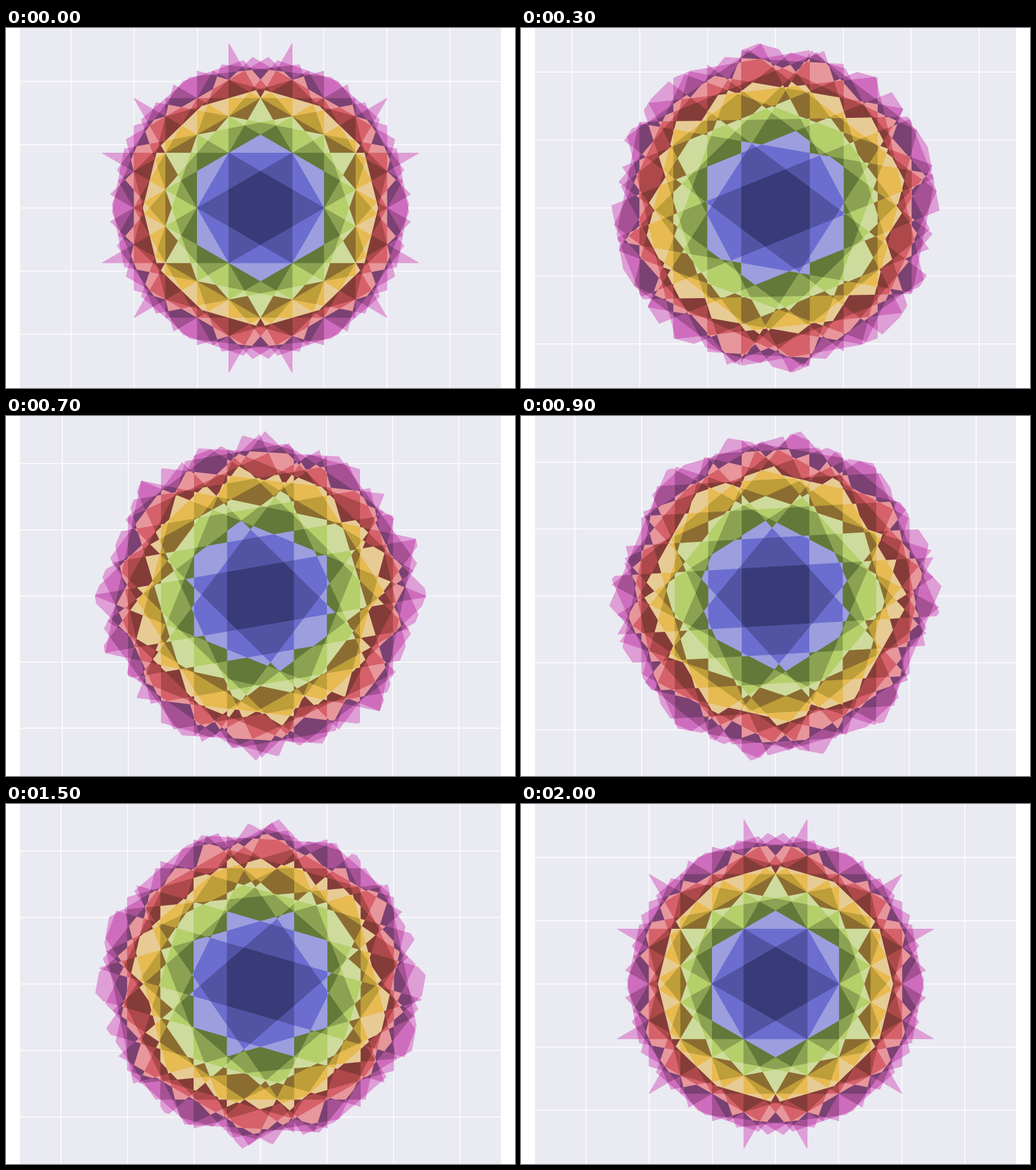
These frames come from a looping animation (890 px wide and 629 px high, 2.1 s). An HTML page with a canvas:

```html
<!DOCTYPE html>
<html lang="en">
<head>
<meta charset="utf-8">
<title>Brillouin zones of a sheared lattice</title>
<style>
  html, body { margin: 0; width: 100%; height: 100%; overflow: hidden; background: #fff; }
  canvas { display: block; }
</style>
</head>
<body>
<canvas id="stage" width="890" height="629"></canvas>
<script>
const ctx = document.getElementById('stage').getContext('2d');
const STEPS = 21, STEP_MS = 100;
const CX = 445, CY = 314.4, HALF_HEIGHT = 286.9;
const ROW = Math.sqrt(3) / 2;

// One colour per zone, innermost first.
const COLORS = ('393b79 5254a3 6b6ecf 9c9ede 637939 8ca252 b5cf6b cedb9c 8c6d31 bd9e39 ' +
  'e7ba52 e7cb94 843c39 ad494a d6616b e7969c 7b4173 a55194 ce6dbd de9ed6')
  .split(' ').map(c => '#' + c);

function latticeVectors(shear) {
  const list = [];
  for (let j = -6; j <= 6; j++) {
    for (let i = -9; i <= 9; i++) {
      const x = i + j * shear, y = j * ROW, half = (x * x + y * y) / 2;
      if (half > 0 && half < 15) list.push({ x, y, half });
    }
  }
  return list;
}

// Directions, modulo a half turn, in which two bisectors cross.
function crossingAngles(vectors) {
  const angles = [];
  vectors.forEach((a, k) => {
    for (const b of vectors.slice(k + 1)) {
      const det = a.x * b.y - a.y * b.x;
      if (Math.abs(det) < 1e-9) continue;
      const x = (a.half * b.y - b.half * a.y) / det;
      const y = (a.x * b.half - b.x * a.half) / det;
      if (x * x + y * y > 7.9) continue;
      angles.push((Math.atan2(y, x) + 2 * Math.PI) % Math.PI);
    }
  });
  angles.sort((a, b) => a - b);
  return angles.filter((a, i) => !i || a - angles[i - 1] > 1e-9);
}

function dropCollinear(points) {
  const n = points.length;
  return points.filter(([x, y], i) => {
    const [px, py] = points[(i + n - 1) % n], [qx, qy] = points[(i + 1) % n];
    return Math.abs((x - px) * (qy - y) - (y - py) * (qx - x)) > 1e-10;
  });
}

// Outline n encloses zones 1 to n: the nth bisector met along each ray.
function zoneOutlines(shear) {
  const vectors = latticeVectors(shear);
  const outlines = COLORS.map(() => []);
  for (const angle of crossingAngles(vectors)) {
    const c = Math.cos(angle), s = Math.sin(angle);
    const hits = [];
    for (const v of vectors) {
      const along = v.x * c + v.y * s;
      if (along > 1e-9) hits.push(v.half / along);
    }
    const radii = Float64Array.from(hits).sort();
    outlines.forEach((points, n) => points.push([radii[n] * c, radii[n] * s]));
  }
  return outlines.map(half => dropCollinear(half.concat(half.map(([x, y]) => [-x, -y]))));
}

function buildScene(step) {
  const outlines = zoneOutlines(step / (STEPS - 1) - 0.5);
  const top = Math.max(...outlines[COLORS.length - 1].map(p => p[1]));
  const scale = HALF_HEIGHT / top;
  const paths = outlines.map(points => {
    const path = new Path2D();
    for (const [x, y] of points) path.lineTo(CX + x * scale, CY - y * scale);
    path.closePath();
    return path;
  });
  return { scale, paths };
}

function drawGrid(scale) {
  ctx.fillStyle = '#fff';
  ctx.fillRect(0, 0, 890, 629);
  ctx.fillStyle = '#eaeaf2';
  ctx.fillRect(24.5, 0, 841, 629);
  ctx.beginPath();
  for (let k = -3; k <= 3; k++) {
    const x = CX + k * scale, y = CY + k * scale;
    ctx.moveTo(x, 0);
    ctx.lineTo(x, 629);
    ctx.moveTo(24.5, y);
    ctx.lineTo(865.5, y);
  }
  ctx.strokeStyle = '#fff';
  ctx.lineWidth = 1.5;
  ctx.stroke();
}

function draw({ scale, paths }) {
  drawGrid(scale);
  ctx.lineWidth = 1.3;
  ctx.lineJoin = 'round';
  for (let n = paths.length - 1; n >= 0; n--) {
    ctx.fillStyle = ctx.strokeStyle = COLORS[n];
    ctx.fill(paths[n]);
    ctx.stroke(paths[n]);
  }
}

const scenes = [];
let shown = -1;

function tick() {
  const step = Math.floor((performance.now() - start) / STEP_MS) % STEPS;
  if (step !== shown) {
    shown = step;
    draw(scenes[step] ||= buildScene(step));
  }
  requestAnimationFrame(tick);
}

const start = performance.now();
tick();
</script>
</body>
</html>
```
